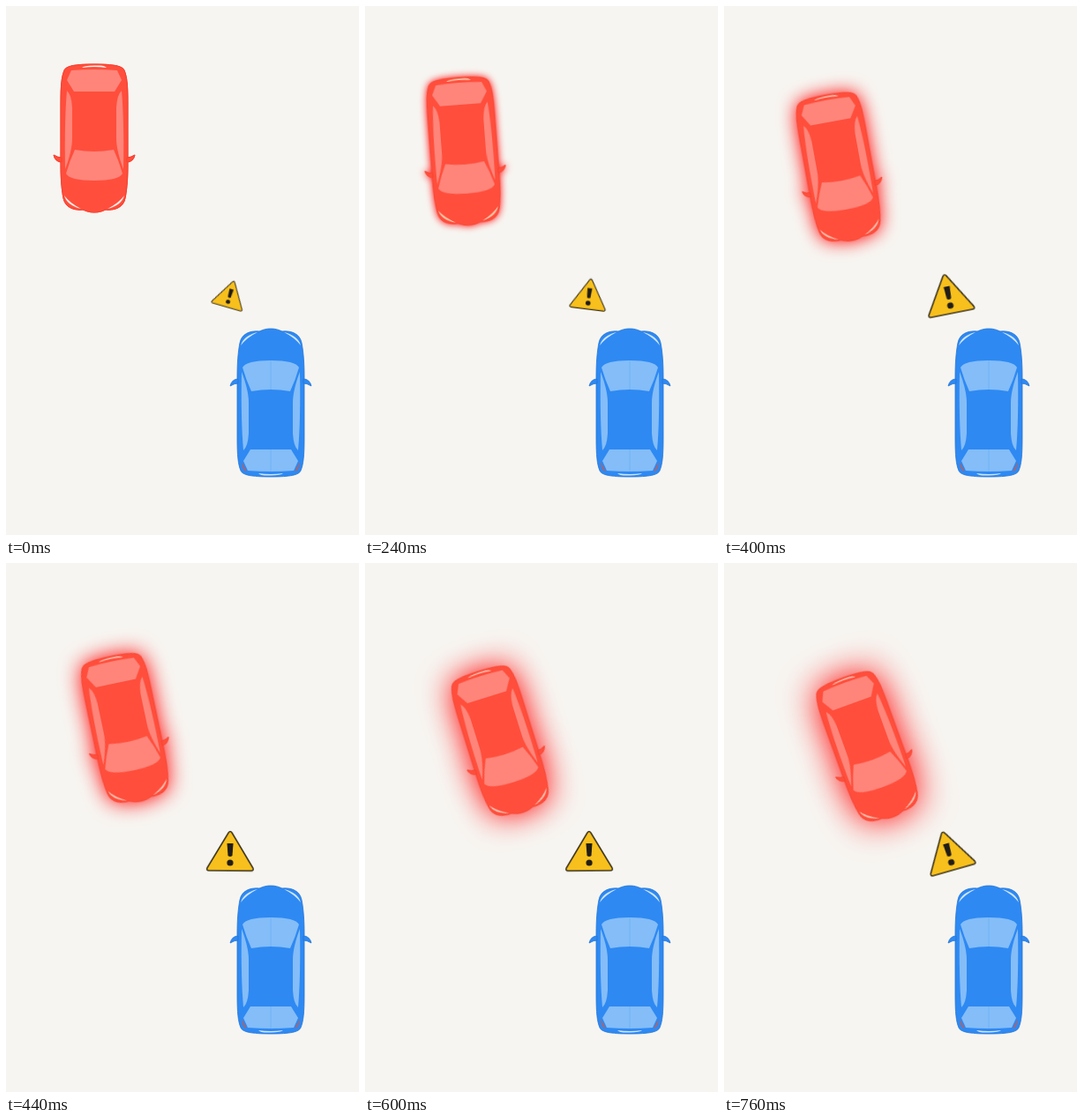
These frames come from a looping animation (400 by 600 pixels, 800 ms). An HTML page without scripts:

```html
<!DOCTYPE html>
<html lang="en">
<head>
<meta charset="utf-8">
<title>Collision warning</title>
<style>
  html, body { margin: 0; width: 100%; height: 100%; overflow: hidden; background: #f7f5f1; }
  svg { display: block; width: 100%; height: 100%; }

  .body { fill: var(--body); stroke: var(--edge); stroke-width: .8; }
  .glass { fill: var(--glass); }
  .light { fill: currentColor; }
  .blue { --body: #2e89f2; --edge: #2475d6; --glass: #84bdf8; color: #cfe5fc; }
  .red {
    --body: #ff4e3c; --edge: #f5432f; --glass: #ff857a;
    transform-origin: 300px 0;
    animation: swerve .8s -8ms cubic-bezier(.37, 0, .63, 1) infinite, lights .8s linear infinite;
  }
  .sign {
    transform-origin: 254px 327px;
    animation: wobble .8s cubic-bezier(.37, 0, .63, 1) infinite;
  }

  /* The car turns about a far pivot while its glow spreads. */
  @keyframes swerve {
    from { transform: rotate(0deg); filter: drop-shadow(0 0 0 #f00); }
    to { transform: rotate(-20deg); filter: drop-shadow(0 0 20px #f00); }
  }
  @keyframes lights {
    0% { color: #fdf0ec; }
    20% { color: #ffe6b4; }
    40%, 100% { color: #ffbfae; }
  }
  @keyframes wobble {
    0%, 22% { transform: rotate(16deg) scale(.68); }
    45%, 85%, 100% { transform: rotate(-16deg); }
    65% { transform: rotate(16deg); }
  }
</style>
</head>
<body>
<svg viewBox="0 0 400 600">
  <defs>
    <g id="side">
      <path class="body" d="M-37-27Q-44-27-46-19Q-41-22-37-22Z"/>
      <path class="glass" d="M-33-35C-28-22-25-10-25 0V35Q-26 50-31 54Q-34 20-33-35Z"/>
      <path class="light" d="M-34-65Q-31-76-15-80Q-27-74-34-65Z"/>
    </g>
    <g id="car">
      <path class="body" d="M0-84C7-84 10-82 13-81C24-82 33-78 35-68C37-58 38-45 38-30V40C38 60 37 70 34 77C32 82 22 84 0 84S-32 82-34 77C-37 70-38 60-38 40V-30C-38-45-37-58-35-68C-33-78-24-82-13-81C-10-82-7-84 0-84Z"/>
      <use href="#side"/>
      <use href="#side" transform="scale(-1 1)"/>
      <path class="glass" d="M-32-40Q-28-48 0-48T32-40Q28-26 22-13Q0-17-22-13Q-28-26-32-40Z"/>
      <path class="glass" d="M-23 53H23L31 66L26 77Q0 79-26 77L-31 66Z"/>
      <path class="light" d="M-14 80Q0 82 14 80Q12 82 0 82.500T-14 80Z"/>
    </g>
    <path id="lamp" d="M-33 67L-27 78Q-32 78-33 67Z" fill="#a9656f"/>
  </defs>

  <g class="blue" transform="translate(300 450)">
    <use href="#car"/>
    <use href="#lamp"/>
    <use href="#lamp" transform="scale(-1 1)"/>
    <path d="M0-48V-15M0 53V78" stroke="#6fb0f5" stroke-width=".8"/>
  </g>

  <g class="red">
    <use href="#car" transform="translate(100 150) rotate(180)"/>
  </g>

  <g class="sign">
    <g transform="translate(254 327)" fill="#211d16">
      <path d="M-2-21Q0-24 2-21L26 19Q27 22 24 22H-24Q-27 22-26 19Z" fill="#f8c01c" stroke="#39321f" stroke-width="1.500" stroke-linejoin="round"/>
      <path d="M-3.500-9H3.500L2.500 5Q0 7-2.500 5Z"/>
      <circle cy="13" r="3.600"/>
    </g>
  </g>
</svg>
</body>
</html>
```
